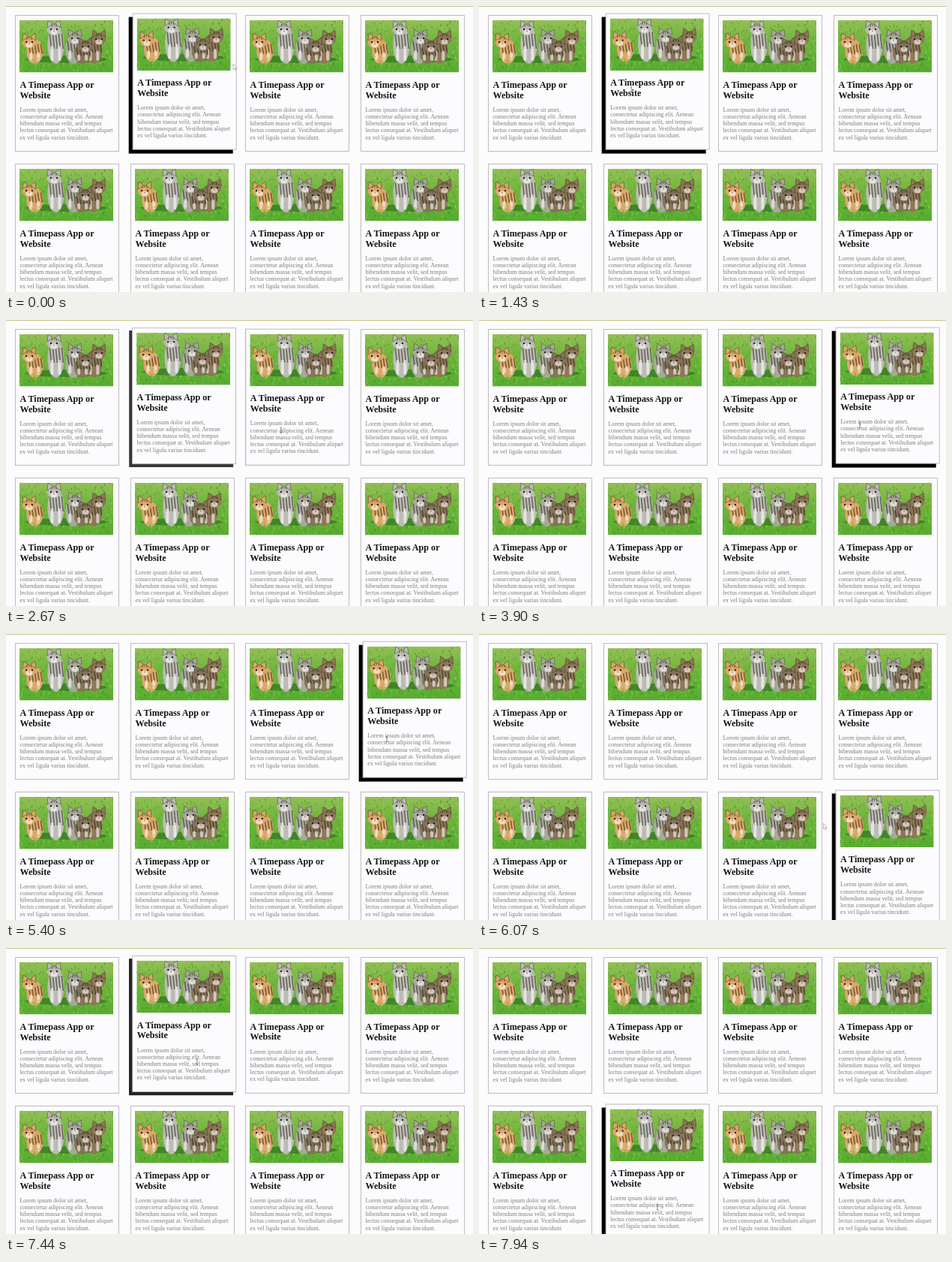
These frames come from a looping animation (623 px wide and 381 px high, 8 s). An HTML page:

```html
<!DOCTYPE html>
<html lang="en">
<head>
<meta charset="utf-8">
<title>Hover cards</title>
<style>
html, body { margin: 0; width: 100%; height: 100%; overflow: hidden; background: #fcfbfe; }
svg { display: block; width: 623px; height: 381px; }
text { font-family: "Liberation Serif", "Times New Roman", serif; white-space: pre; }
.title { font-size: 12.15px; font-weight: bold; fill: #141414; }
.body { font-size: 7.97px; fill: #7f7e7b; }
</style>
</head>
<body>
<svg id="stage" viewBox="0 0 623 381" xmlns="http://www.w3.org/2000/svg">
  <defs>
    <linearGradient id="lawn" x2="0" y2="1">
      <stop offset="0" stop-color="#93bf55"/>
      <stop offset=".4" stop-color="#70b53d"/>
      <stop offset="1" stop-color="#58ac30"/>
    </linearGradient>
    <clipPath id="frame"><rect width="125" height="69.5"/></clipPath>
    <g id="card"></g>
  </defs>
  <rect width="623" height="381" fill="#fcfbfe"/>
  <rect width="623" height="1" fill="#c9c58f"/>
  <g id="cards"></g>
  <path id="arrow" d="M0 0V7.5L1.8 6L3 8.6L4 8.1L2.9 5.6H5.3Z" fill="#fff" stroke="#888" stroke-width=".6"/>
  <path id="beam" d="M-1 -3.5H1M0 -3.5V3.5M-1 3.5H1" fill="none" stroke="#555" stroke-width=".7"/>
</svg>
<script>
const LOOP = 8000, FADE = 200, WIDE = 138, HIGH = 181;
const $ = id => document.getElementById(id);

// --- card contents ---
let seed = 7;
const rnd = () => (seed = seed * 16807 % 2147483647) / 2147483647;

function blades(count, color, top) {
  let d = '';
  for (let i = 0; i < count; i++)
    d += `M${(rnd() * 125).toFixed(1)} ${(top + rnd() * (70 - top)).toFixed(1)}l${(rnd() * 4 - 2).toFixed(1)} -3`;
  return `<path d="${d}" stroke="${color}" stroke-width=".8" opacity=".7"/>`;
}

const oval = (x, y, rx, ry, fill) => `<ellipse cx="${x}" cy="${y}" rx="${rx}" ry="${ry}" fill="${fill}"/>`;
const DARK = '#2a241c99', PALE = '#fff9';

// The body hangs below the head and leans towards the middle of the group.
function kitten([x, y, fur]) {
  const bx = x + (62 - x) * .15, by = (y + 54) / 2, ry = (62 - y) / 2;
  let bands = '', legs = '', face = '';
  for (let i = -2; i <= 2; i++) bands += `M${bx + i * 4} ${by - ry * .6}l2 ${ry * .8}`;
  for (const s of [-1, 1]) {
    legs += `M${bx + s * 5} ${by + 3}V52`;
    face += `<path d="M${x + s * 9} ${y - 2}l${-s} -10l${-s * 7} 5Z" fill="${fur}" stroke="${DARK}" stroke-width=".7"/>` +
      oval(x + s * 4, y, 1.2, 1.2, '#222');
  }
  return oval(bx, by, 11, ry, fur) +
    `<path d="${bands}" stroke="${DARK}" stroke-width="1.5"/>
    <path d="${legs}" stroke="${PALE}" stroke-width="4" stroke-linecap="round"/>` +
    oval(x, y, 9.5, 8.3, fur) + oval(x, y + 4, 4.5, 3.2, PALE) + face +
    `<path d="M${x - 3} ${y - 7}v4m3 -5v4m3 -3v4" stroke="${DARK}"/>` +
    oval(x, y + 2.5, 1, .7, '#a8705f');
}

const litter = [
  [74, 24, '#a9a99c'], [106, 25, '#8e7856'], [13, 29, '#dca868'], [46, 12, '#bcbcb4'], [88, 35, '#85735a']
];

const lines = (cls, y, step, list) =>
  list.map((s, i) => `<text class="${cls}" x="6" y="${y + i * step}">${s}</text>`).join('');

$('card').innerHTML =
  `<rect width="${WIDE}" height="${HIGH}" fill="#fcfbfe" stroke="#bfbdba"/>
  <g transform="translate(5.5 6.5)" clip-path="url(#frame)" fill="none">
    <rect width="125" height="69.5" fill="url(#lawn)"/>` +
  blades(130, '#3f8426', 0) + blades(130, '#a3d969', 10) +
  oval(62, 52, 54, 5, '#2c6a1f99') + litter.map(kitten).join('') + blades(60, '#4dab2b', 52) +
  '</g>' +
  lines('title', 96.3, 13.7, ['A Timepass App or', 'Website']) +
  lines('body', 128.2, 9.2, [
    'Lorem ipsum dolor sit amet,', 'consectetur adipiscing elit. Aenean', 'bibendum massa velit, sed tempus',
    'lectus consequat at. Vestibulum aliquet', 'ex vel ligula varius tincidunt.']);

// --- grid ---
const cards = Array.from({ length: 8 }, (_, i) => ({
  x: 12.5 + Math.round(i % 4 * 153.67),
  y: 12.5 + (i > 3 ? 198 : 0),
  hovers: []
}));
$('cards').innerHTML = cards.map(() =>
  `<g><rect x="-.5" y="-.5" width="${WIDE + 1}" height="${HIGH + 1}"/><use href="#card"/></g>`).join('');
cards.forEach((c, i) => {
  c.node = $('cards').children[i];
  c.shadow = c.node.firstChild;
});

// --- motion ---
// pointer stops: time, x, y
const path = [
  [0, 303, 77], [1300, 303, 77], [1540, 120, 140], [2020, 120, 140], [2220, 235, 146], [2600, 235, 146],
  [2670, 367, 147], [3000, 367, 147], [3320, 508, 140], [5450, 508, 140], [5650, 515, 255], [6030, 515, 255],
  [6136, 371, 248], [6645, 371, 248], [6840, 368, 165], [7180, 368, 165], [7480, 238, 150], [7620, 238, 150],
  [7940, 238, 345], [LOOP + 1, 238, 345]
];

function pointer(t) {
  const n = path.findIndex(p => p[0] > t);
  const [t0, x0, y0] = path[n - 1], [t1, x1, y1] = path[n];
  const k = (t - t0) / (t1 - t0);
  return [x0 + (x1 - x0) * k, y0 + (y1 - y0) * k];
}

const cardAt = (x, y) => cards.find(c => x >= c.x && x <= c.x + WIDE && y >= c.y && y <= c.y + HIGH);

// Walk the path once and note when the pointer enters and leaves each card.
for (let t = 0, last; t < LOOP; t += 2) {
  const now = cardAt(...pointer(t));
  if (now === last) continue;
  if (last) last.hovers.at(-1).leave = t;
  if (now) now.hovers.push({ enter: t || -FADE, leave: LOOP });
  last = now;
}

// CSS "ease": cubic-bezier(.25, .1, .25, 1)
function ease(k) {
  if (k <= 0) return 0;
  if (k >= 1) return 1;
  let lo = 0, hi = 1, u;
  for (let i = 0; i < 20; i++) {
    u = (lo + hi) / 2;
    if (.75 * u * (1 - u) + u ** 3 < k) lo = u; else hi = u;
  }
  return .3 * u * (1 - u) ** 2 + 3 * u * u * (1 - u) + u ** 3;
}

function draw(t) {
  for (const c of cards) {
    let p = 0;
    for (const h of c.hovers) p += ease((t - h.enter) / FADE) - ease((t - h.leave) / FADE);
    c.node.setAttribute('transform', `translate(${c.x + 2.7 * p} ${c.y - 2.4 * p})`);
    c.shadow.setAttribute('transform', `translate(${-5 * p} ${5 * p})`);
    c.shadow.setAttribute('opacity', p);
  }
  const [x, y] = pointer(t), c = cardAt(x, y);
  const onText = c && x < c.x + 131 && y > c.y + 85;
  $('arrow').style.display = onText ? 'none' : '';
  $('beam').style.display = onText ? '' : 'none';
  for (const id of ['arrow', 'beam']) $(id).setAttribute('transform', `translate(${x} ${y})`);
}

const start = performance.now();
function tick() {
  draw((performance.now() - start) % LOOP);
  requestAnimationFrame(tick);
}
tick();
</script>
</body>
</html>
```
